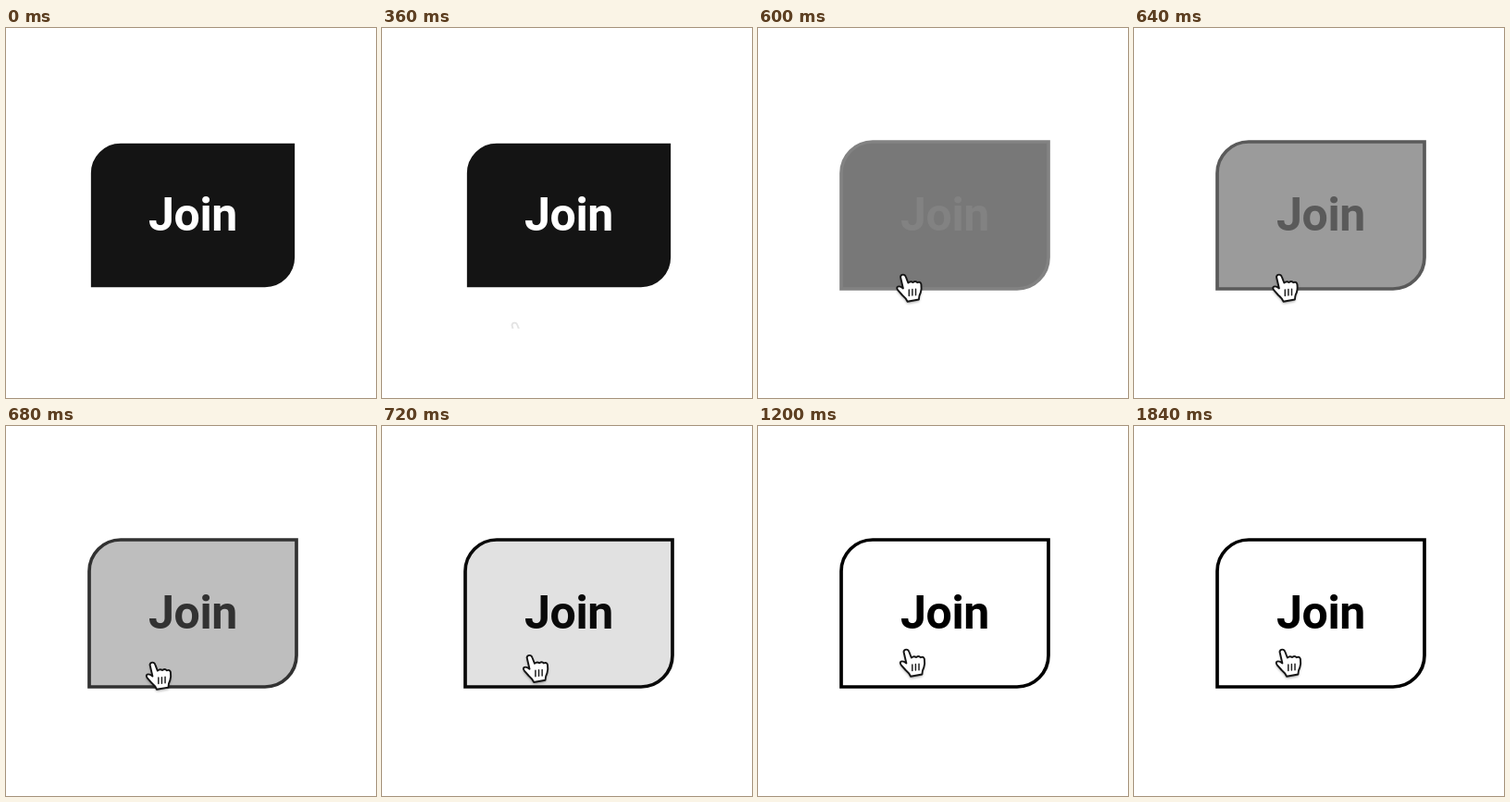
Write an HTML page that moves like this. It is 400 px wide and 400 px high and loops after 1.92 s.

```html
<!DOCTYPE html>
<html lang="en">
<head>
<meta charset="utf-8">
<title>Join button</title>
<style>
  html, body { margin: 0; width: 100%; height: 100%; overflow: hidden; background: #fff; }
  svg { display: block; width: 100vw; height: 100vh; }
  text { font: 700 50px Roboto, Inter, sans-serif; letter-spacing: -0.4px; }
</style>
</head>
<body>
<svg viewBox="0 0 400 400">
  <defs>
    <clipPath id="view"><rect width="400" height="325"/></clipPath>
    <filter id="soft" x="-50%" y="-50%" width="200%" height="200%">
      <feGaussianBlur stdDeviation="1.4"/>
    </filter>
    <path id="hand" d="M-2.5 3Q-2 0.6 0.3 0.6Q2.5 0.6 3.3 3L5.8 9.5Q8.5 7.2 11 9Q14 7 15.7 9.2Q19 7.8 19.9 11Q20.6 16 19.3 20Q17.6 23 17.4 27.5L5 29.7Q3.4 26 -0.3 23L-5.3 17.3Q-7.2 14.6 -5.3 13.6Q-3 12.6 0.4 15.5Z"/>
  </defs>
  <path id="button" d="M124 123H314V248A34 34 0 0 1 280 282H90V157A34 34 0 0 1 124 123Z" stroke-width="3.7"/>
  <text id="label" x="154" y="219">Join</text>
  <g clip-path="url(#view)">
    <g id="cursor" stroke-linejoin="round" stroke-linecap="round">
      <use href="#hand" y="2" opacity="0.38" filter="url(#soft)"/>
      <use href="#hand" fill="#fff" stroke="#151515" stroke-width="1.9"/>
      <path d="M6.8 17V23.5M10.4 16.6V23.1M14 16.2V22.7" stroke="#222" stroke-width="1.5"/>
    </g>
  </g>
</svg>
<script>
  const LOOP = 1920, STEP = 40;
  const [button, label, cursor] = ["button", "label", "cursor"].map(id => document.getElementById(id));

  const progress = (t, from, to) => Math.min(1, Math.max(0, (t - from) / (to - from)));
  const easeOut = p => 1 - (1 - p) ** 2;
  const mix = (a, b, p) => a + (b - a) * p;

  function gray(from, to, p) {
    const v = Math.round(mix(from, to, p));
    return `rgb(${v},${v},${v})`;
  }

  function draw(time) {
    const t = Math.floor(time % LOOP / STEP) * STEP;

    // Hover colours
    const dark = gray(255, 0, progress(t, 475, 730));
    button.setAttribute("fill", gray(20, 255, progress(t, 485, 755)));
    button.setAttribute("stroke", dark);
    label.setAttribute("fill", dark);

    // The hand enters from below, rests on the edge, then moves further in
    const enter = easeOut(progress(t, 360, 560));
    const settle = easeOut(progress(t, 640, 800));
    const x = mix(143, 156.5, enter) + 3.5 * settle;
    const y = mix(318, 266, enter) - 25 * settle;
    cursor.setAttribute("opacity", progress(t, 350, 440));
    cursor.setAttribute("transform", `translate(${x} ${y})`);
  }

  let start;
  function tick(now) {
    start ??= now;
    draw(Math.max(0, now - start));
    requestAnimationFrame(tick);
  }
  draw(0);
  requestAnimationFrame(tick);
</script>
</body>
</html>
```
